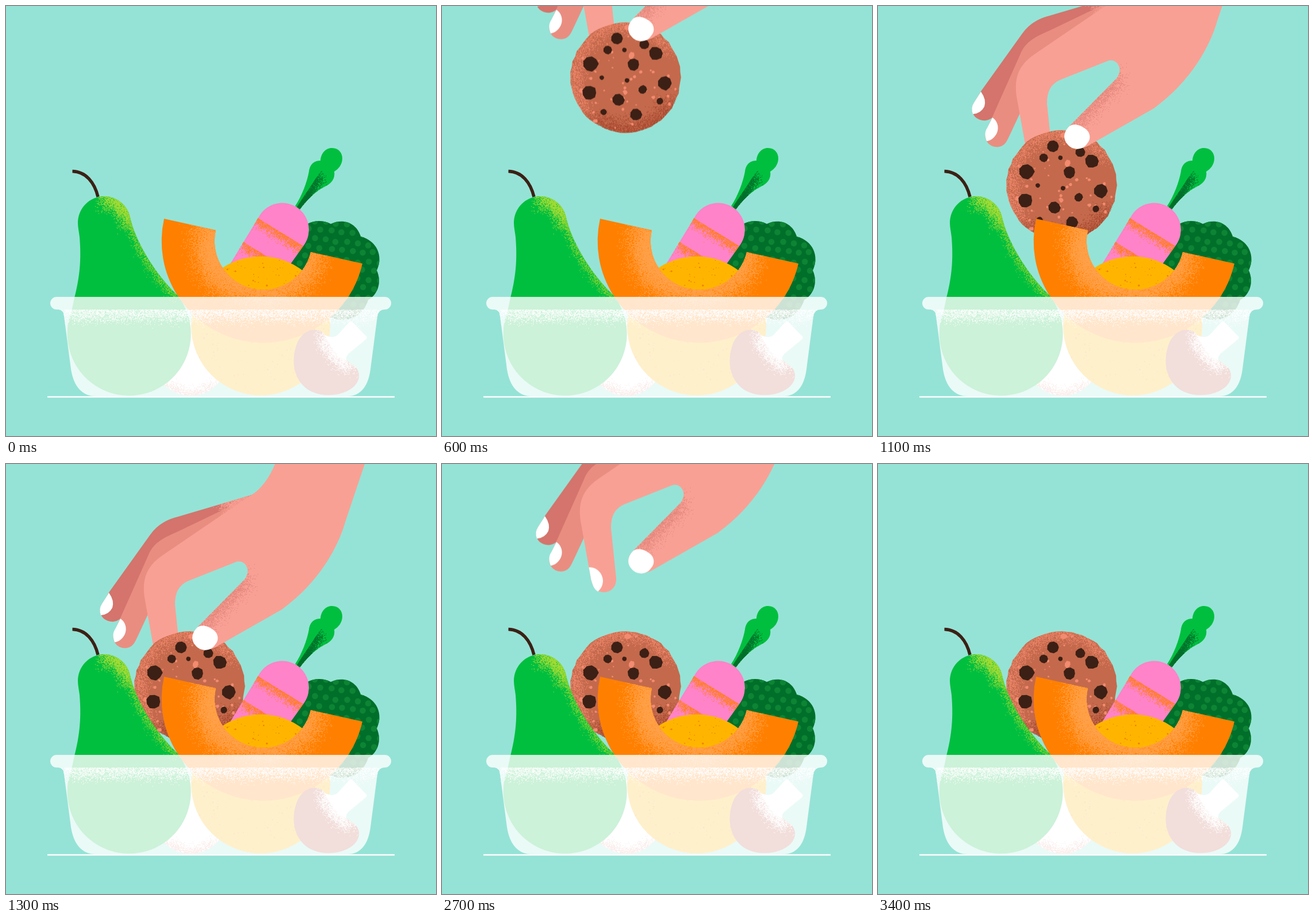
Write an HTML page with a canvas that moves like this. It is 748 px wide and 748 px high and loops after 6400 ms.

```html
<!DOCTYPE html>
<html lang="en">
<head>
<meta charset="utf-8">
<title>Lunch box</title>
<style>
html, body { margin: 0; height: 100%; overflow: hidden; background: #95e3d6; }
canvas { display: block; }
</style>
</head>
<body>
<canvas id="stage" width="748" height="748"></canvas>
<script>
const SIZE = 748, LOOP = 6400, STEP = 100;
const COOKIE = { x: 319.5, y: 386.8, r: 96 };
const stage = document.getElementById('stage').getContext('2d');

let seed = 7;
const rand = () => (seed = (seed * 48271) % 2147483647) / 2147483647;
const spread = () => (rand() + rand() + rand()) * 2 - 3;

function layer(draw) {
  const canvas = document.createElement('canvas');
  canvas.width = canvas.height = SIZE;
  draw(canvas.getContext('2d'));
  return canvas;
}

function fill(c, d, color) {
  c.fillStyle = color;
  c.fill(new Path2D(d));
}

function dot(c, x, y, r, color) {
  c.fillStyle = color;
  c.beginPath();
  c.arc(x, y, r, 0, 7);
  c.fill();
}

// Rough-edged disc
function chunk(c, x, y, r, sides, rough, color) {
  c.fillStyle = color;
  c.beginPath();
  for (let i = 0; i < sides; i++) {
    const a = i / sides * 2 * Math.PI, q = r + (rand() - .5) * rough;
    c.lineTo(x + q * Math.cos(a), y + q * Math.sin(a));
  }
  c.fill();
}

// Grain scattered around a line, kept inside a shape
function spray(c, shape, line, color, width, count) {
  const path = document.createElementNS('http://www.w3.org/2000/svg', 'path');
  path.setAttribute('d', line);
  const length = path.getTotalLength(), points = [];
  for (let i = 0; i <= 200; i++) points.push(path.getPointAtLength(length * i / 200));
  c.save();
  c.clip(new Path2D(shape));
  c.fillStyle = color;
  for (let i = 0; i < count; i++) {
    const p = points[Math.floor(rand() * 201)];
    c.fillRect(p.x + spread() * width, p.y + spread() * width, 1.1, 1.1);
  }
  c.restore();
}

const hand = layer(c => {
  const ring = 'M430 53 L298 92 C272 99 260 110 248 127 L180 222 L166 245 C158 262 172 276 188 274 C200 272 205 262 210 255 L260 200 L410 80Z';
  const middle = 'M402 68 L300 117 C270 130 256 138 247 160 L198 270 L188 292 C182 310 196 322 210 320 C222 318 225 308 229 300 L250 255 L260 200 L410 80Z';
  const palm = 'M468 0 H624 L591 98 C578 145 545 205 480 253 L364 319 Q345 328 331 315 Q318 300 331 286 L413 203 C428 188 418 166 401 170 L318 203 Q293 213 294 245 L303 332 C304 350 290 358 278 356 C266 354 262 345 259.5 335 L241 232 C236 195 248 175 275 157 L400 72 L427 54 Q452 38 468 0Z';
  fill(c, ring, '#d4746c');
  spray(c, ring, 'M385 73 L430 58', '#f9a094', 11, 2600);
  fill(c, middle, '#ea8d81');
  spray(c, middle, 'M390 78 L410 66', '#f9a094', 10, 900);
  fill(c, palm, '#f9a094');
  spray(c, palm, 'M338 279 L416 200', '#e1857b', 11, 2400);
  fill(c, 'M179 224 Q189 238 185 250 Q179 262 165 263 Q161 252 167 243Z', '#fff');
  fill(c, 'M199 269 C210 276 212 292 203 302 C198 308 192 310 189 310 C185 300 186 293 190 287Z', '#fff');
  fill(c, 'M255.5 313 C270 312 280 325 280 336 C280 346 275 352 271 355 C264 351 262 343 259.5 335Z', '#fff');
  fill(c, 'M331 286 C338 278 350 281 360 288 C371 296 370 308 364 314 C356 327 338 326 330 316 C322 308 322 296 331 286Z', '#fff');
});

const cookie = layer(c => {
  const { x, y, r } = COOKIE;
  const disc = `M${x - r} ${y} a${r} ${r} 0 0 1 ${2 * r} 0 a${r} ${r} 0 0 1 ${-2 * r} 0Z`;
  chunk(c, x, y, r, 64, 2.5, '#c4694c');
  spray(c, disc, 'M246 446 C205 370 250 290 325 291 C360 293 385 318 398 337', '#f28b70', 10, 3800);
  spray(c, disc, 'M262 463 C310 495 375 485 405 432', '#a5482f', 12, 3600);
  for (let i = 0; i < 46; i++) {
    const a = rand() * 7, q = Math.sqrt(rand()) * 90;
    chunk(c, x + q * Math.cos(a), y + q * Math.sin(a), 1 + rand() * 2, 6, 1.2, '#f28b70');
  }
  for (const [fx, fy, fr] of [[323, 300, 6], [330, 349, 5.5], [319, 413, 4.5], [267, 463, 4], [243, 410, 4]])
    chunk(c, fx, fy, fr, 7, 3, '#f28b70');
  const chips = [
    [304, 319, 10], [288, 339, 7.5], [317.5, 339, 4], [352, 329, 8.5], [372, 345, 12],
    [333, 364.5, 10.5], [258.5, 363, 13.5], [278, 387, 4], [322, 392, 4], [387.5, 397, 12],
    [256.5, 413.5, 12.5], [349, 408, 7.5], [307, 426, 10.5], [379, 428, 6], [338, 451.5, 10.5], [281, 447, 5.5]
  ];
  for (const [cx, cy, cr] of chips) chunk(c, cx, cy, cr, 9, cr * .15, '#3c2015');
});

const food = layer(c => {
  // Broccoli
  const broccoli = 'M524 379 Q545 369 565 379 C588 368 611 379 617 401 C645 408 657 435 645 460 C655 482 645 504 630 511 C622 540 590 555 562 540 L500 500 L490 450Z';
  fill(c, broccoli, '#006f2a');
  c.save();
  c.clip(new Path2D(broccoli));
  for (let row = 0; row < 12; row++)
    for (let col = 0; col < 11; col++)
      dot(c, 482 + col * 18.5 + row % 2 * 9 + spread(), 376 + row * 15.5 + col * 2 - 8 + spread(), 5.3, '#0d8434');
  c.restore();

  // Turnip
  const turnip = 'M257 614 a64 64 0 0 1 128 0 a64 64 0 0 1 -128 0Z';
  fill(c, turnip, '#fff');
  spray(c, turnip, 'M270 657 Q321 702 372 657', '#e39a90', 8, 1800);

  // Radish and its leaf
  const leaf = 'M503 348 C515 330 524 305 527 288 C529 273 538 269 547 269 C548 254 558 247 567 247 C579 247 585 256 585 265 C585 276 578 284 571 288 C573 300 566 309 555 314 C540 321 524 336 511 354Z';
  fill(c, leaf, '#00bf3f');
  const shade = 'M506 350 L551 282 L575 290 L560 314 L512 356Z';
  c.save();
  c.clip(new Path2D(leaf));
  spray(c, shade, 'M507 350 L545 298', '#00702c', 6, 1500);
  spray(c, shade, 'M508 350 L530 325', '#00702c', 4, 900);
  c.restore();
  const radish = 'M442 363 A46 46 0 1 1 519 415 L460 498 L360 498Z';
  fill(c, radish, '#ff83c8');
  c.save();
  c.clip(new Path2D(radish));
  for (const [x, y] of [[435, 367], [409, 408]])
    spray(c, `M${x} ${y} l92 57 l-25 40 l-92 -57Z`, `M${x} ${y} l92 57`, '#ff7f1c', 7.5, 2400);
  c.restore();

  // Orange
  dot(c, 443, 556.5, 121, '#ffb500');
  for (let i = 0; i < 420; i++) {
    const a = rand() * 7, q = Math.sqrt(rand()) * 119;
    dot(c, 443 + q * Math.cos(a), 556.5 + q * Math.sin(a), .4 + rand() * rand() * 1.4, '#f08200');
  }

  // Melon: both arcs are half circles, so the radii grow to fit
  const melon = 'M275 370 A176 176 0 0 0 620 448 L530 428 A84 84 0 0 1 365 390Z';
  fill(c, melon, '#ff8000');
  spray(c, melon, 'M365 390 A84 84 0 0 0 530 428', '#ffa24c', 17, 17000);
  spray(c, melon, 'M362 385 Q360 440 395 478', '#ffa24c', 23, 7000);

  // Pear
  const pear = 'M125 377 A46 46 0 0 1 171 331 A46 46 0 0 1 216 368 C223 402 254 461 298 503 A107.5 107.5 0 1 1 107 562 C108 545 114 535 118 512 C129 470 131 440 128 402 C127 393 125 385 125 377Z';
  fill(c, pear, '#00bf3f');
  spray(c, pear, 'M172 335 C200 334 213 352 217 377', '#a9dc36', 10, 2800);
  spray(c, pear, 'M216 368 C223 402 254 461 298 503', '#8fd433', 6.5, 1900);
  c.strokeStyle = '#3c2015';
  c.lineWidth = 5.5;
  c.stroke(new Path2D('M115.5 287.5 C139 288 154 307 160 332'));

  // Mushroom
  const cap = 'M553 570 C545 560 520 558 507 585 C493 620 502 655 530 670 C555 682 590 678 607 660 C618 648 615 634 606 626 C590 615 570 600 553 570Z';
  fill(c, cap, '#be5a4b');
  fill(c, 'M554 572 Q570 580 578 571 L597 550 Q600 547 603 550 L627 575 Q629 577 626 580 L598 603 Q590 609 592 617 Q570 605 554 572Z', '#fff');
  spray(c, cap, 'M556 573 Q568 602 598 622', '#fff', 10, 2800);

  // Box
  const body = 'M92 528 Q100 529 101 540 L113 632 C118 662 132 679 158 679 H592 C617 679 630 662 634 632 L646 540 Q648 528 658 528Z';
  fill(c, 'M88 506 H659 A11 11 0 0 1 659 528 Q648 528 646 540 L634 632 C630 662 617 679 592 679 H158 C132 679 118 662 113 632 L101 540 Q100 529 92 528 H88 A11 11 0 0 1 88 506Z', 'rgba(255,255,255,.8)');
  spray(c, body, 'M98 528 H650', '#fff', 11, 12000);
  c.fillStyle = '#fff';
  c.fillRect(72, 678.7, 604, 2.5);
});

function frame(time) {
  const step = Math.floor(time % LOOP / STEP);
  const drop = Math.min(0, (step - 13) * 37.5);
  const handY = step <= 23 ? drop : (23 - step) * 100 / 3;
  const thumbX = 322, thumbW = SIZE - thumbX;
  stage.fillStyle = '#95e3d6';
  stage.fillRect(0, 0, SIZE, SIZE);
  // The cookie sits between the fingers and the thumb
  stage.drawImage(hand, 0, 0, thumbX, SIZE, 0, handY, thumbX, SIZE);
  stage.drawImage(cookie, 0, drop);
  stage.drawImage(hand, thumbX, 0, thumbW, SIZE, thumbX, handY, thumbW, SIZE);
  stage.drawImage(food, 0, 0);
  requestAnimationFrame(frame);
}
frame(0);
</script>
</body>
</html>
```
